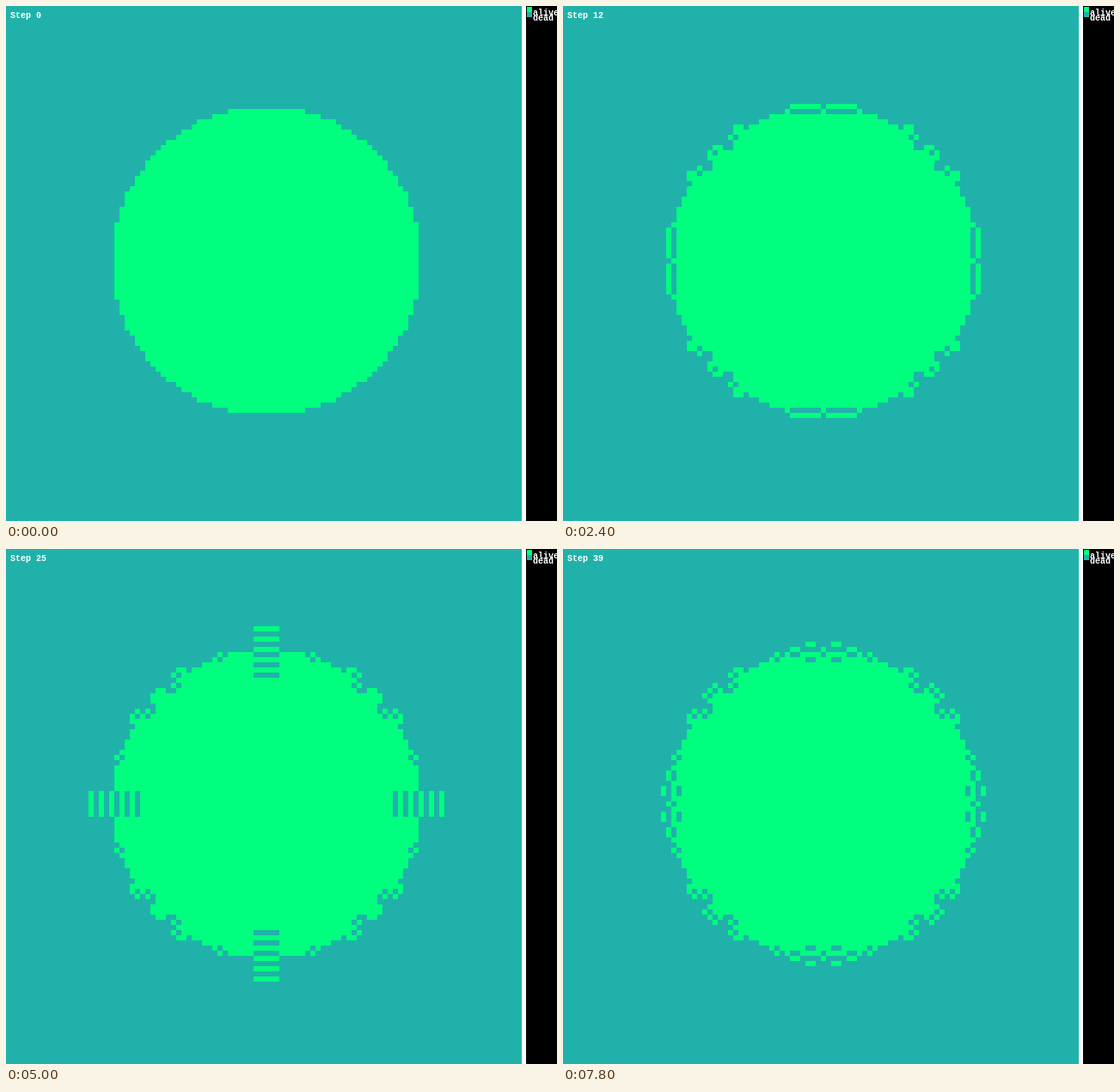
Recreate the animation shown at these times as an HTML page. Size 641 by 600 pixels, loop 8 s.

```html
<!DOCTYPE html>
<html lang="en">
<head>
<meta charset="utf-8">
<title>Day &amp; Night automaton</title>
<style>
  html, body { margin: 0; width: 100%; height: 100%; overflow: hidden; background: #000; }
  svg { display: block; }
  text { font: bold 10px "Liberation Mono", monospace; fill: #fff; white-space: pre; }
</style>
</head>
<body>
<svg width="641" height="600" viewBox="0 0 641 600">
  <g shape-rendering="crispEdges">
    <rect width="641" height="600" fill="#000"/>
    <rect width="600" height="600" fill="#20b2aa"/>
    <rect x="600" width="5" height="600" fill="#fff"/>
    <path id="cells" fill="#00ff7f"/>
    <rect x="606" y="1" width="6" height="6" fill="#00ff7f"/>
    <rect x="606" y="7" width="6" height="6" fill="#20b2aa"/>
  </g>
  <text id="label" x="5" y="14">Step 0</text>
  <text x="613" y="11">alive</text>
  <text x="613" y="17">dead</text>
</svg>
<script>
const SIZE = 100, CELL = 6, STEPS = 40, STEP_MS = 200;
const BORN = [3, 6, 7, 8], SURVIVE = [3, 4, 6, 7, 8];
const cells = document.getElementById('cells');
const label = document.getElementById('label');

const makeGrid = rule => Array.from({ length: SIZE }, (_, y) =>
  Array.from({ length: SIZE }, (_, x) => rule(x, y) ? 1 : 0));

function neighbours(grid, x, y) {
  let sum = -grid[y][x];
  for (let dy = -1; dy <= 1; dy++)
    for (let dx = -1; dx <= 1; dx++)
      sum += grid[(y + dy + SIZE) % SIZE][(x + dx + SIZE) % SIZE];
  return sum;
}

const evolve = grid => makeGrid((x, y) =>
  (grid[y][x] ? SURVIVE : BORN).includes(neighbours(grid, x, y)));

// One rectangle per horizontal run of live cells
function toPath(grid) {
  let d = '';
  grid.forEach((row, y) => {
    for (let x = 0; x < SIZE; x++) {
      if (!row[x]) continue;
      const start = x;
      while (row[x]) x++;
      d += `M${start * CELL} ${y * CELL}H${x * CELL}v${CELL}H${start * CELL}z`;
    }
  });
  return d;
}

const paths = [];
let grid = makeGrid((x, y) => (x - 50) ** 2 + (y - 49) ** 2 < 900);
for (let i = 0; i < STEPS; i++) {
  paths.push(toPath(grid));
  grid = evolve(grid);
}

let shown = -1;
function draw(ms) {
  const step = Math.floor(ms / STEP_MS) % STEPS;
  if (step === shown) return;
  shown = step;
  cells.setAttribute('d', paths[step]);
  label.textContent = 'Step ' + step;
}

let begin;
function tick(now) {
  begin ??= now;
  draw(now - begin);
  requestAnimationFrame(tick);
}
draw(0);
requestAnimationFrame(tick);
</script>
</body>
</html>
```
